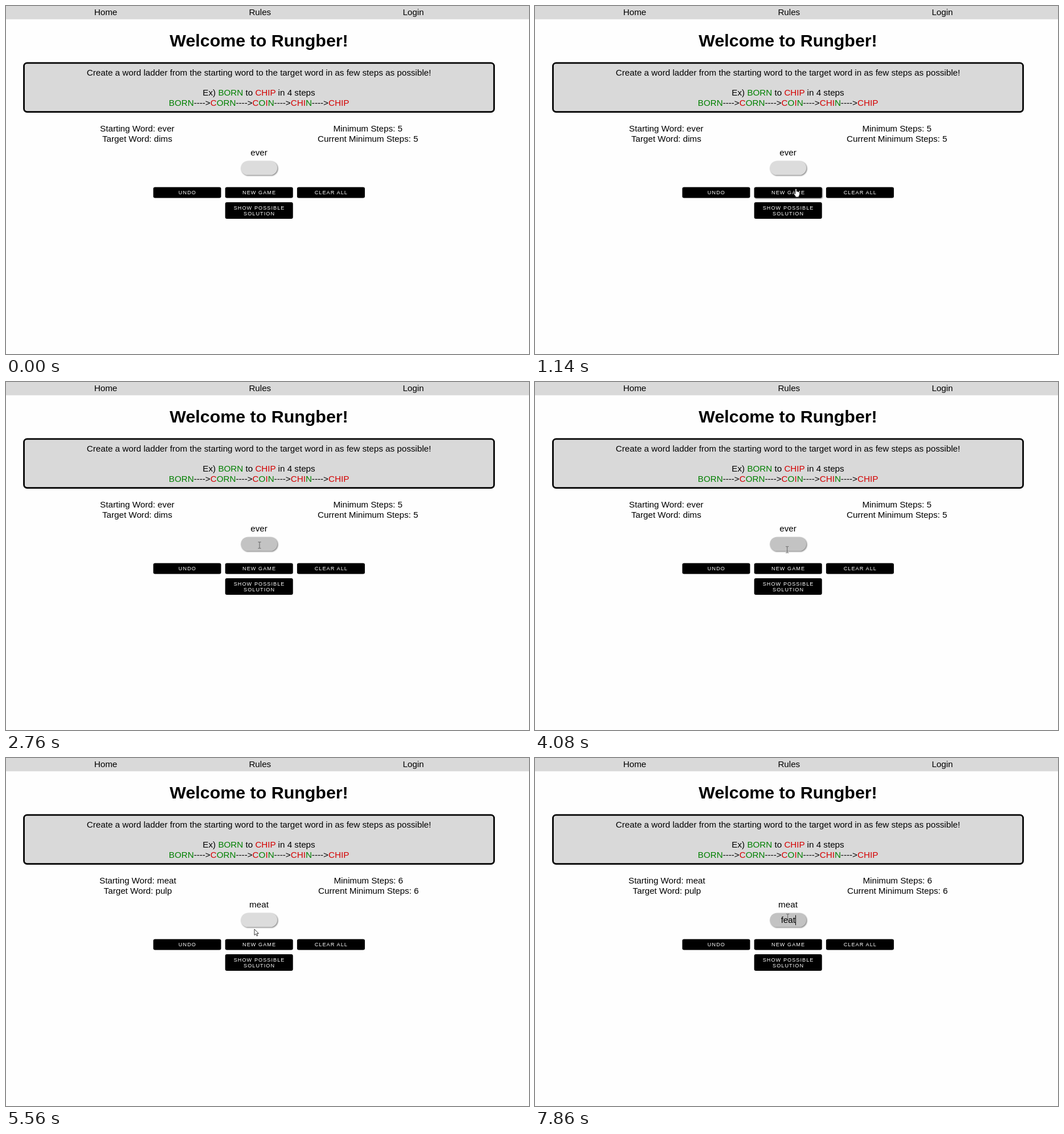
Recreate the animation shown at these times as an HTML page. Size 918 by 610 pixels, loop 8 s.

```html
<!DOCTYPE html>
<html lang="en">
<head>
<meta charset="utf-8">
<title>Word ladder</title>
<style>
html, body { margin: 0; width: 100%; height: 100%; overflow: hidden; background: #fefefe; }
svg { display: block; }
text { font: 15.2px "Liberation Sans", Arial, sans-serif; text-anchor: middle; white-space: pre; }
.title { font-size: 30.4px; font-weight: bold; }
.label { font-size: 9.12px; letter-spacing: 1.07px; fill: #fff; }
.g { fill: #008000; }
.r { fill: #d40000; }
.shadow { filter: drop-shadow(1.4px 1.4px 1.2px rgba(0, 0, 0, .55)); }
</style>
</head>
<body>
<svg width="918" height="610" viewBox="0 0 918 610">
  <rect width="918" height="23.3" fill="#d9d9d9"/>
  <text x="175" y="16">Home</text>
  <text x="445.8" y="16">Rules</text>
  <text x="715" y="16">Login</text>
  <text class="title" x="444" y="71">Welcome to Rungber!</text>

  <rect x="31.5" y="99.8" width="825.2" height="85.8" rx="5.5" fill="#d9d9d9" stroke="#000" stroke-width="2.8"/>
  <text x="444" y="121.5">Create a word ladder from the starting word to the target word in as few steps as possible!</text>
  <text x="444" y="157">Ex) <tspan class="g">BORN</tspan> to <tspan class="r">CHIP</tspan> in 4 steps</text>
  <text id="chain" x="444" y="174.5"></text>

  <text id="start" y="220"></text>
  <text id="target" y="238"></text>
  <text id="min" y="220"></text>
  <text id="cur" y="238"></text>
  <text id="word" x="444" y="262"></text>

  <rect id="pill" class="shadow" x="412.3" y="271.7" width="64" height="24.6" rx="12.3"/>
  <text id="typed" x="444.3" y="289"></text>
  <rect id="caret" y="275.5" width="1" height="17.5"/>
  <g id="buttons"></g>

  <path id="arrow" d="M0 0V10.5L2.5 8.3 4.2 12 5.9 11.2 4.3 7.6H7.4Z" fill="#fff" stroke="#222" stroke-width=".9"/>
  <path id="hand" d="M-1.2 1Q0-.9 1.2 1V5.2Q2.3 4.2 3 5.4 4.2 4.7 4.8 6 6.4 5.4 6.4 7.4V10.4Q6.2 12.2 5 13.3V15H-.8V13.5L-3.8 9.6Q-4.3 7.7-2.5 8.3L-1.2 9.5Z" fill="#fff" stroke="#111" stroke-width=".8"/>
  <path id="beam" d="M-2.5-5.5H-.8L0-5 .8-5.5H2.5M0-5V5M-2.5 5.5H-.8L0 5 .8 5.5H2.5" fill="none" stroke="#4a4a4a" stroke-width=".8"/>
</svg>
<script>
const LOOP = 8000, STEP = 65, BLINK = 500;
const $ = id => document.getElementById(id);
const show = (el, on) => el.style.display = on ? '' : 'none';

// Letters already in their final place are red
const goal = 'CHIP';
$('chain').innerHTML = ['BORN', 'CORN', 'COIN', 'CHIN', goal].map(word =>
  [...word].map((c, i) => `<tspan class="${c === goal[i] ? 'r' : 'g'}">${c}</tspan>`).join('')).join('----&gt;');

const W = 119;
const button = (col, y, h, ...lines) => {
  const mid = 444.2 + col * 126.2, x = mid - W / 2;
  const label = lines.map((s, i) => `<text class="label" x="${mid + .4}" y="${y + 12.6 + i * 10.3}">${s}</text>`);
  $('buttons').insertAdjacentHTML('beforeend',
    `<g><rect x="${x}" y="${y}" width="${W}" height="${h}" rx="3"/>${label.join('')}</g>`);
  return { x, y, h, rect: $('buttons').lastElementChild.firstElementChild };
};
const buttons = [
  button(-1, 317.4, 19, 'UNDO'),
  button(0, 317.4, 19, 'NEW GAME'),
  button(1, 317.4, 19, 'CLEAR ALL'),
  button(0, 344, 29, 'SHOW POSSIBLE', 'SOLUTION')
];

// Pointer moves: start, end, where to
const enter = 130, origin = [854, 597];
const moves = [
  [enter, 910, 459, 337], [910, 1140, 458, 320], [1240, 1740, 426, 276], [1740, 1820, 434, 280],
  [2040, 2600, 445, 286], [3920, 4710, 434, 324], [5100, 5560, 436, 300],
  [5560, 5980, 446, 288], [5980, 6300, 443.6, 279]
];
const reload = 4810, typing = 7590, keyGap = 90;
const focus = [[2240, reload], [6480, LOOP]];

const ease = u => u + Math.sin(Math.PI * u) / 12;

function pointer(t) {
  let [x, y] = origin;
  for (const [from, to, nx, ny] of moves) {
    if (t < from) break;
    const n = Math.round((to - from) / STEP);
    const u = ease(Math.min(1, Math.floor((t - from) / (to - from) * n) / n));
    x += (nx - x) * u;
    y += (ny - y) * u;
  }
  return [x, y];
}

function put(id, text, x) {
  const el = $(id);
  if (el.textContent !== text) el.textContent = text;
  if (x) el.setAttribute('x', x);
}

function draw(t) {
  const [x, y] = pointer(t);
  const inPill = x > 412 && x < 477 && y > 271.5 && y < 297;
  let onButton = false;
  for (const b of buttons) {
    const over = x > b.x && x < b.x + W && y > b.y && y < b.y + b.h;
    b.rect.setAttribute('class', over ? 'shadow' : '');
    onButton = onButton || over;
  }
  $('pill').setAttribute('fill', inPill ? '#c3c3c3' : '#dcdcdc');

  const shape = inPill ? 'beam' : onButton ? 'hand' : 'arrow';
  for (const id of ['arrow', 'hand', 'beam']) {
    show($(id), t >= enter && id === shape);
    $(id).setAttribute('transform', `translate(${x} ${y})`);
  }

  const fresh = t >= reload + 60;
  const [word, target, steps, shift] = fresh ? ['meat', 'pulp', 6, 1] : ['ever', 'dims', 5, 0];
  put('start', 'Starting Word: ' + word, 230.4 + shift);
  put('target', 'Target Word: ' + target, 230.4 + shift);
  put('min', 'Minimum Steps: ' + steps, 635.2 + shift);
  put('cur', 'Current Minimum Steps: ' + steps, 635.2 + shift);
  put('word', word);

  const typed = 'feat'.slice(0, Math.max(0, Math.floor((t - typing) / keyGap) + 1));
  put('typed', typed);
  const lit = ([a, b]) => t >= a && t < b && (typed || (t - a) % (2 * BLINK) < BLINK);
  show($('caret'), focus.some(lit));
  const width = typed ? $('typed').getComputedTextLength() : 0;
  $('caret').setAttribute('x', Math.round(444 + width / 2));
}

const begin = performance.now();
function tick() {
  draw((performance.now() - begin) % LOOP);
  requestAnimationFrame(tick);
}
tick();
</script>
</body>
</html>
```
